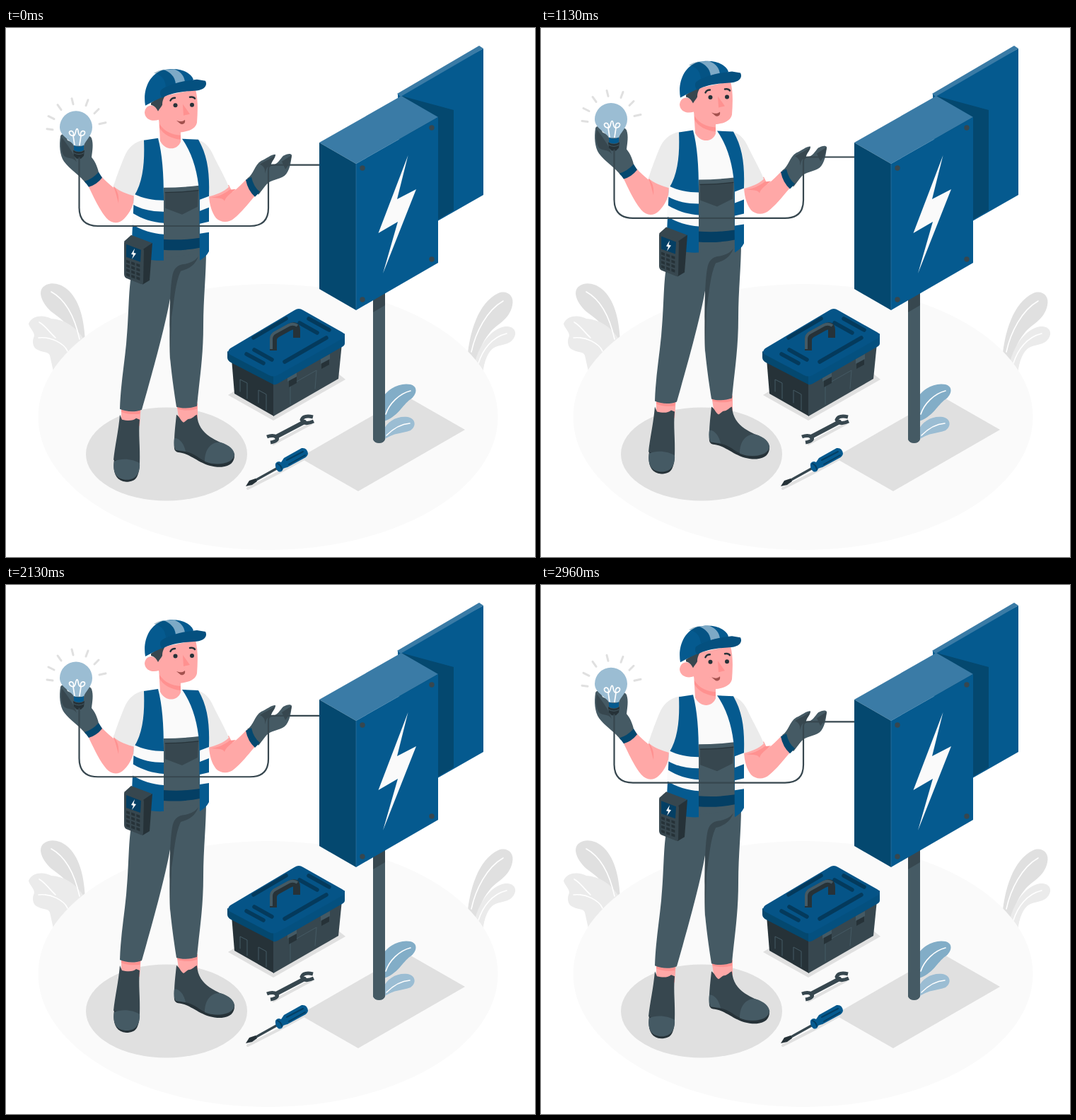
Recreate the animation shown at these times as an HTML page. Size 748x748 px, loop 3 s.

```html
<!DOCTYPE html>
<html lang="en">
<head>
<meta charset="utf-8">
<title>Electrician</title>
<style>
  html, body { margin: 0; height: 100%; overflow: hidden; background: #fff; }
  svg { display: block; width: 100vw; height: 100vh; }
  .blue { fill: #055a8f; }
  .navy { fill: #04486f; }
  .pale { fill: #3a7ba6; }
  .sky { fill: #9bbdd3; }
  .slate { fill: #455a64; }
  .dark { fill: #37474f; }
  .ink { fill: #263238; }
  .skin { fill: #ffa8a7; }
  .blush { fill: #ff9190; }
  .white { fill: #fafafa; }
  .grey { fill: #e0e0e0; }
  .mist { fill: #ebebeb; }
  .line { fill: none; stroke-linecap: round; stroke-linejoin: round; }
</style>
</head>
<body>
<svg viewBox="0 0 748 748">
  <!-- grey plants -->
  <path class="grey" d="M104 452C99 428 82 414 64 401C54 392 45 377 51 368C59 358 75 360 86 369C103 383 111 410 112 446Z"/>
  <path class="mist" d="M110 440C99 422 82 412 64 411C54 406 38 405 32 418C33 425 43 431 39 438C37 443 38 451 43 454C50 459 60 457 62 463L68 490L112 450Z"/>
  <path class="grey" d="M652 470C655 430 668 388 696 375C709 370 719 379 716 392C712 413 693 419 684 431C673 444 667 460 664 480Z"/>
  <path class="mist" d="M661 482C666 451 685 425 706 422C719 421 724 431 717 440C710 449 699 447 690 452C682 457 676 470 674 490Z"/>
  <g class="line" stroke="#fff" stroke-width="1.6">
    <path d="M64 373C84 384 97 408 104 440M46 438C64 436 82 446 87 457M47 416C56 421 61 430 70 438M703 386C680 399 664 430 658 458M708 432C687 437 674 455 668 474"/>
  </g>

  <ellipse class="white" cx="370.500" cy="550" rx="325" ry="188"/>
  <ellipse class="grey" cx="227" cy="602.500" rx="114" ry="66"/>
  <path class="grey" d="M415 607.500L566 520.500L649 568L498 655Z"/>

  <g id="man">
    <!-- ankles and boots -->
    <path class="skin" d="M163 532H191L189 562H163ZM241 530H271V562H246Z"/>
    <path class="blush" d="M163 538C173 543 183 543 190 540L189 545C179 546 169 545 163 542ZM242 535C252 538 263 537 270 534V538C260 541 250 540 243 538Z"/>
    <path class="ink" d="M154 603C150 624 153 640 170 641C185 641 189 633 189 608ZM238 588C237 598 240 599 248 600C265 603 278 621 305 620C318 619 324 612 323 601Z"/>
    <path class="dark" d="M161 546L164 553C172 555 180 555 184 551L189 553C187 575 190 590 189 616L152 610C154 590 159 570 161 546Z"/>
    <path class="slate" d="M153 612C164 607 181 609 189 615C190 629 183 638 171 638C157 638 150 629 153 612Z"/>
    <path class="dark" d="M241 546C246 549 247 555 251 557C254 556 256 552 259 552C263 552 267 547 270 546C271 561 278 570 288 577C301 586 317 589 321 598C324 605 320 612 312 614C294 619 281 613 270 605C260 598 248 597 240 596C236 588 239 566 241 546Z"/>
    <path class="slate" d="M281 612C281 595 290 584 303 585C317 589 324 597 323 604C320 615 297 619 281 612ZM238 579C246 579 252 588 254 598L240 596C237 592 237 585 238 579Z"/>

    <!-- trousers -->
    <path class="slate" d="M178 312H283C283 350 279 380 279 420C279 466 273 500 270 534C261 537 250 538 241 535C237 510 234 487 232 466C231 440 233 410 232 382C224 426 206 490 192 539C182 543 170 542 161 538C162 505 167 477 170 446C174 404 173 372 177 350Z"/>
    <path class="dark" d="M232 470C231 425 231 374 235 351C237 339 242 334 253 333C262 331 268 328 272 322C268 334 259 340 247 343C239 360 238 385 234 408Z"/>

    <!-- arms -->
    <path class="skin" d="M153 220L182 235C181 250 175 261 167 269C159 277 149 276 142 268C131 255 124 238 116 222L134 208C140 215 146 220 152 225Z"/>
    <path class="blush" d="M152 223C158 229 160 237 159 247C157 239 155 231 152 223Z"/>
    <path class="skin" d="M287 234L315 221L320 231C328 226 334 219 341 212L355 233C343 247 334 259 323 268C314 276 303 274 297 268C290 259 287 246 287 234Z"/>
    <path class="blush" d="M289 239C299 238 309 234 316 228L325 227C318 233 311 237 309 244C307 239 299 240 289 239Z"/>

    <!-- shirt -->
    <path class="white" d="M195 158L221 154L250 155L275 160V235H195Z"/>
    <path class="mist" d="M197 157C181 160 173 168 167 182C160 199 155 213 152 223C160 230 171 234 182 237L197 214ZM268 157C282 159 288 168 294 181C302 197 310 211 315 224C308 231 297 235 286 238L276 190Z"/>

    <!-- overall bib -->
    <path class="slate" d="M223 225Q248 225 273 222L276 318L220 325Z"/>
    <path class="dark" d="M225 231Q249 231 272 228L271 252L249 263L225 254Z"/>
    <path class="line" stroke="#263238" stroke-width="1" d="M225 232Q249 232 272 229"/>
    <path fill="#043f64" d="M222 298Q250 300 274 296V310Q250 315 222 313Z"/>

    <!-- vest -->
    <path class="blue" d="M195 158L215 155C221 178 223 205 223 240V328C207 329 191 325 177 319L181 237C195 215 196 185 195 158Z"/>
    <path class="blue" d="M249 156L272 157C285 180 288 203 287 235V315C284 321 279 325 274 328L273 230C271 202 263 176 249 156Z"/>
    <path class="white" d="M181 234C193 240 208 243 223 243V259C207 259 192 256 180 249ZM179 261C192 269 207 274 223 275V291C207 290 192 285 178 277ZM274 242L287 237V253L274 258ZM274 276L287 273V288L274 290Z"/>

    <!-- head -->
    <path class="skin" d="M216 126L218 159C225 173 242 173 247 160V140Z"/>
    <path class="blush" d="M217 135C224 146 235 150 247 151V157C235 156 222 150 217 140Z"/>
    <path class="skin" d="M211 98L268 86C272 102 271 118 270 133C268 143 256 146 245 147C231 146 220 139 216 129C207 132 197 129 196 119C197 109 206 106 212 112Z"/>
    <path class="dark" d="M205 105C211 101 218 96 226 92C224 98 221 100 221 108C219 112 217 113 215 117C212 111 209 109 205 108Z"/>
    <path class="blush" d="M250 107L260 121L251 123Z"/>
    <circle class="ink" cx="239.500" cy="108.500" r="3"/>
    <circle class="ink" cx="263" cy="108" r="3"/>
    <path class="line" stroke="#263238" stroke-width="2.400" d="M232.500 102Q234 98 239 98M260 97Q265 96 267 99"/>
    <path fill="#a3514e" d="M241 130C246 132 250 132 253 129C254 134 251 136 247 135Z"/>

    <!-- cap -->
    <path class="blue" d="M197 109C193 86 203 65 221 59C242 54 260 60 265 72L250 88C230 91 212 101 197 109Z"/>
    <path class="navy" d="M209 63Q215 59 222 58C234 61 239 69 239 78L226 82C225 72 220 65 209 63Z" opacity=".35"/>
    <path class="sky" d="M222 58L238 57.500C248 61 252 68 253 75L240 78C239 68 232 61 222 58Z" opacity=".8"/>
    <path fill="#04507f" d="M219 87C229 79 250 74 270 72L282 74C286 82 278 88 266 88C248 89 233 91 221 98C218 95 217 91 219 87Z"/>

    <!-- meter -->
    <path class="dark" d="M167 301L177 292L206 303L195 313Z"/>
    <path class="ink" d="M194 312L207 303L203 356L193 362Z"/>
    <path class="dark" d="M167 303Q167 299 171 301L192 309Q195 311 195 315L194 359Q194 363 190 361L170 353Q167 351 167 347Z"/>
    <path fill="#043f64" d="M170 305L191 313L190 330L170 323Z"/>
    <path class="white" d="M182 311L177 319L180 320L178 326L184 318L180.500 317Z"/>
    <g id="keys" class="ink"></g>

    <!-- left glove and bulb -->
    <path class="slate" d="M113 219C105 208 90 199 82 188C76 179 75 165 77 152C80 147 84 150 87 158C96 163 107 164 110 158C112 153 118 149 121 155C124 163 122 174 121 182C127 189 130 198 132 207Z"/>
    <path class="dark" d="M79 154C76 166 79 176 82 180C88 185 95 181 100 189C95 174 86 164 79 154Z"/>
    <path class="navy" d="M111 216Q122 213 131 203L136 211Q128 221 117 224Z"/>
    <path class="sky" d="M76 139.500A23 23 0 1 1 122 139.500C122 152 112 158 110 166H96C93 158 76 153 76 139.500Z"/>
    <path class="line" stroke="#fff" stroke-width="1.700" d="M97 165L95 152C88 151 88 144 93 145C97 147 95 152 95 152C99 152 98 142 100.500 142C103 142 101 152 106 152C106 152 104 147 108 145C113 144 113 151 106 152L104 165"/>
    <path class="blue" d="M96 165Q103 169 110 165V172Q103 176 96 172Z"/>
    <path class="ink" d="M95 172Q103 177 111 172L110 180L106 184H100L96 180Z"/>
    <path class="line" stroke="#455a64" stroke-width="1" d="M96 176Q103 180 110 176"/>
    <path class="line" stroke="#e0e0e0" stroke-width="3" d="M58 142L66 143M60 124L68 128M73 108L78 115M93 99L95 107M116 101L113 109M131 114L125 120M141 133L132 135"/>

    <!-- right glove -->
    <path class="slate" d="M341 212C350 207 351 193 361 187C369 184 374 178 381 178C382 182 375 188 375 193C384 193 387 185 392 180C397 177 403 176 404 179C403 189 401 202 394 208C386 214 374 213 367 222L357 235Z"/>
    <path class="dark" d="M359 192C366 187 374 185 380 179C381 184 374 188 374 194C368 195 368 200 366 205C367 198 364 194 359 192ZM390 188L404 179C403 187 399 195 395 199Z"/>
    <path class="navy" d="M339 214L347 210Q350 224 359 231L352 238Q342 229 339 214Z"/>
    <path class="line" stroke="#37474f" stroke-width="2.200" d="M103.500 183V253Q103.500 279.300 130 279.300H345Q371 279.300 371 254V199Q371 193 377 193H455"/>
  </g>

  <!-- toolbox -->
  <path class="grey" d="M314 519L322 514L470 489L480 497L378 555Z"/>
  <path class="ink" d="M319 468L379 500V549L323 517Z"/>
  <path class="dark" d="M378 500L475 446L470 496L378 549Z"/>
  <path class="line" stroke="#455a64" stroke-width="1" d="M331 514V497L341 502V524M357 530V512L368 518V540M402 532V505L439 484L437 510"/>
  <path class="ink" d="M400 498L411 492V502L400 508ZM446 472L457 466V476L446 482Z"/>
  <path class="slate" d="M398 493L411 486V493L398 500ZM445 468L458 461V468L445 475Z"/>
  <path class="navy" d="M313 457L378 490V504L318 473Q313 470 313 466Z"/>
  <path fill="#04507f" d="M378 490L479 432V446Q479 449 475 451L384 503Q380 505 378 504Z"/>
  <path fill="#055487" d="M317 453L408 399Q414 395 420 399L475 430Q483 434 476 439L384 491Q378 494 372 491L317 462Q311 458 317 453Z"/>
  <g class="line">
    <path stroke="#043a5c" stroke-width="5.500" d="M350 438L396 411M394 472L453 438M340 461L364 474M351 455L376 469M415 417L440 431M428 411L457 427"/>
    <path stroke="#263238" stroke-width="10" stroke-linecap="butt" d="M378 456V441Q378 436 383 433L401 423Q411 418 411 427V438"/>
    <path stroke="#455a64" stroke-width="4" stroke-linecap="butt" d="M375 454V440Q375 434 380 431L400 420Q407 417 412 421"/>
  </g>

  <!-- wrench and screwdriver -->
  <path class="line" stroke="#e0e0e0" stroke-width="4" d="M378 588L432 559M342 651L389 627L427 606"/>
  <g class="line" stroke="#37474f">
    <path stroke-width="6" d="M382 578L422 557"/>
    <path stroke-width="5" stroke-linecap="butt" d="M369 578Q377 575 383 578Q386 584 374 586M434 550Q421 547 418 554Q422 562 435 556"/>
    <path stroke-width="3.500" d="M350 641L386 621"/>
  </g>
  <path class="ink" d="M339 648L344 640L353 637L355 641L348 646Z"/>
  <path class="blue" d="M381 616Q384 611 389 614L393 608L418 594Q426 593 427 602Q426 606 422 608L398 621Q394 622 392 623Q390 629 385 627Q380 623 381 616Z"/>
  <path class="line" stroke="#043f64" stroke-width="2" d="M397 611L420 599M400 617L423 604M384 616Q389 618 390 624"/>

  <!-- blue plant and pole -->
  <path fill="#82adc7" d="M532 560V524C540 509 558 501 572 504C583 507 581 518 572 525C560 533 555 550 532 557Z"/>
  <path class="sky" d="M533 582V570C539 556 553 548 568 550C579 552 581 563 572 569C560 574 550 571 533 583Z"/>
  <path class="line" stroke="#fff" stroke-width="1.600" d="M572 513C556 517 542 531 537 546M571 559C556 560 546 568 538 576"/>
  <path class="slate" d="M519 370H536V582Q534 587 527.500 587Q521 587 519 582Z"/>
  <path class="dark" d="M519 370H536V392L519 402Z"/>

  <!-- electrical cabinet -->
  <path class="blue" d="M554 94L675 29V236L611 272.500L558 240Z"/>
  <path class="pale" d="M553 93L669 25L675 29L558 97Z"/>
  <path class="navy" d="M559 96L633 116V258L611 271L590 250Z"/>
  <path class="pale" d="M443 162L559 96L611 126L495 192Z"/>
  <path class="navy" d="M443 162L495 192V399L443 369Z"/>
  <path class="blue" d="M495 192L611 126V332L495 399Z"/>
  <path class="line" stroke="#3a7ba6" stroke-width=".6" d="M495 192V398"/>
  <g class="dark">
    <circle cx="504" cy="198" r="3.700"/>
    <circle cx="602" cy="141" r="3.700"/>
    <circle cx="602" cy="327" r="3.700"/>
    <circle cx="504" cy="384" r="3.700"/>
  </g>
  <path class="white" d="M568.500 180L526.500 290L554 274L533 347L580 228L553 242Z"/>
</svg>
<script>
  const LOOP = 3000, RISE = 14.96, FPS = 24, REST = 0.7;
  const man = document.getElementById('man');

  // keypad: three columns, four rows, skewed with the meter's face
  let keys = '';
  for (let row = 0; row < 4; row++)
    for (let col = 0; col < 3; col++) {
      const x = 170 + col * 7.2, y = 327 + row * 6.2 + col * 2.5;
      keys += `<path d="M${x} ${y}l5 1.800v3.800l-5 -1.800z"/>`;
    }
  document.getElementById('keys').innerHTML = keys;

  const start = performance.now();
  function draw() {
    const t = (performance.now() - start) % LOOP;
    const step = Math.floor(t * FPS / 1000 + 0.1);
    const phase = step * 1000 / FPS / LOOP;
    const lift = RISE * (1 - Math.abs(1 - 2 * phase));
    man.setAttribute('transform', `translate(0 ${REST - lift})`);
    requestAnimationFrame(draw);
  }
  draw();
</script>
</body>
</html>
```
